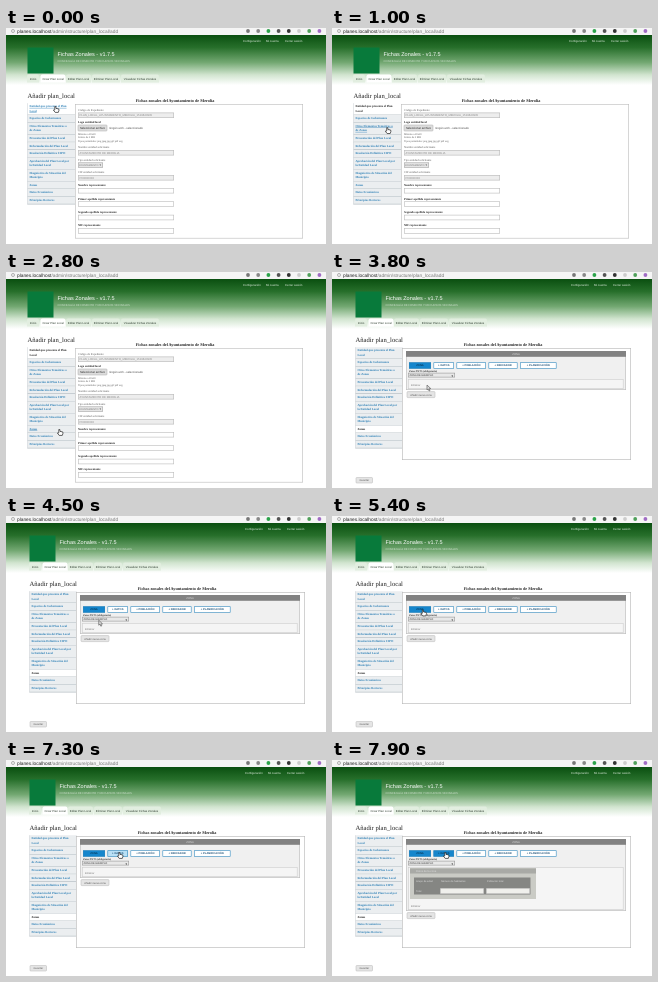
An HTML page with a canvas for the animation above (8 s loop, 320 by 216 pixels).

```html
<!DOCTYPE html>
<html lang="es">
<head>
<meta charset="utf-8">
<title>Añadir plan_local</title>
<style>
  html, body { margin: 0; width: 100%; height: 100%; overflow: hidden; background: #fff; }
  canvas { display: block; width: 320px; height: 216px; }
</style>
</head>
<body>
<canvas id="stage"></canvas>
<script>
const LOOP = 8000;
const SANS = '"Liberation Sans", sans-serif';
const SERIF = '"Liberation Serif", serif';
const BLUE = '#2c7fb5';
const TAB_BLUE = '#1686cc';

const canvas = document.getElementById('stage');
const ctx = canvas.getContext('2d');
const ratio = window.devicePixelRatio || 1;
canvas.width = 320 * ratio;
canvas.height = 216 * ratio;
ctx.scale(ratio, ratio);
ctx.textRendering = 'geometricPrecision';

function box(x, y, w, h, fill, stroke) {
  if (fill) { ctx.fillStyle = fill; ctx.fillRect(x, y, w, h); }
  if (stroke) {
    ctx.strokeStyle = stroke;
    ctx.lineWidth = 0.6;
    ctx.strokeRect(x + 0.3, y + 0.3, w - 0.6, h - 0.6);
  }
}

function round(x, y, w, h, r, fill, stroke) {
  ctx.beginPath();
  ctx.roundRect(x, y, w, h, r);
  ctx.fillStyle = fill;
  ctx.fill();
  if (stroke) { ctx.strokeStyle = stroke; ctx.lineWidth = 0.5; ctx.stroke(); }
}

function dot(x, y, r, fill) {
  ctx.beginPath();
  ctx.arc(x, y, r, 0, Math.PI * 2);
  ctx.fillStyle = fill;
  ctx.fill();
}

function text(str, x, y, size, color, font = SERIF, weight = '', align = 'left') {
  ctx.font = `${weight} ${size}px ${font}`;
  ctx.textAlign = align;
  ctx.fillStyle = color;
  ctx.fillText(str, x, y);
  return ctx.measureText(str).width;
}

const progress = (t, from, to) => Math.min(1, Math.max(0, (t - from) / (to - from)));
const ease = p => p * p * (3 - 2 * p);

// Pointer stops: time, x, y
const stops = [
  [0, 50, 80], [400, 50, 80], [1200, 57, 105], [1800, 56, 143], [2200, 54, 159],
  [3000, 54, 159], [3800, 96, 113], [4100, 96, 113], [4900, 91.5, 95.5],
  [6500, 91.5, 95.5], [7100, 114, 94], [LOOP, 114, 94]
];

function pointerAt(t) {
  const i = stops.findIndex(s => s[0] > t);
  const [t0, x0, y0] = stops[i - 1], [t1, x1, y1] = stops[i];
  const p = ease(progress(t, t0, t1));
  return { x: x0 + (x1 - x0) * p, y: y0 + (y1 - y0) * p };
}

function drawPointer({ x, y }, hand) {
  ctx.save();
  ctx.translate(x, y);
  ctx.beginPath();
  const outline = hand
    ? [[-1.2, -1.5], [-0.2, -1.5], [0, 0.4], [2.7, 0.9], [3, 2.2], [2.3, 4.4], [-0.8, 4.4], [-2.6, 2], [-1.2, 1.8]]
    : [[-1, 0], [-1, 5], [0.2, 4], [1.1, 6], [2, 5.6], [1.1, 3.7], [2.8, 3.6]];
  outline.forEach(p => ctx.lineTo(...p));
  ctx.closePath();
  ctx.fillStyle = hand ? '#fff' : '#ddd';
  ctx.strokeStyle = hand ? '#222' : '#666';
  ctx.lineWidth = 0.7;
  ctx.fill();
  ctx.stroke();
  ctx.restore();
}

function drawBrowser() {
  box(0, 0, 320, 7, '#f5f5f5');
  dot(7, 3, 1.7, '#888');
  dot(7, 3, 1.1, '#f5f5f5');
  const host = text('planes.localhost', 11, 4.6, 4.8, '#222', SANS);
  text('/admin/structure/plan_local/add', 11 + host, 4.6, 4.8, '#777', SANS);
  ['#777', '#888', '#2ba34a', '#555', '#333', '#ccc', '#4fa05a', '#a06cc4']
    .forEach((c, i) => dot(242 + i * 10.2, 3, 1.9, c));

  const green = ctx.createLinearGradient(0, 7, 0, 57);
  [[0, '#0a4f10'], [0.25, '#276f2b'], [0.55, '#73a872'], [0.8, '#d2e5d0'], [1, '#fff']]
    .forEach(s => green.addColorStop(...s));
  box(0, 7, 320, 50, green);
}

function drawHeader() {
  box(21.5, 19.5, 26, 26, '#087a3b');
  text('Fichas Zonales - v1.7.5', 51.5, 27.8, 5.5, '#fff', SANS);
  text('CONCEJALÍA DE FOMENTO Y RECURSOS VECINALES', 51.5, 33.8, 2.8, '#cfe0cf', SANS);
  [['Configuración', 237], ['Mi cuenta', 260], ['Cerrar sesión', 279]]
    .forEach(([s, x]) => text(s, x, 14.3, 2.9, '#e8f3e8', SANS));

  [['Inicio', 21, 12], ['Crear Plan Local', 34.5, 25], ['Editar Plan Local', 60, 25],
   ['Eliminar Plan Local', 86, 28], ['Visualizar Fichas Zonales', 115, 38]].forEach(([s, x, w], i) => {
    round(x, 46.5, w, 8, [2, 2, 0, 0], i === 1 ? '#fff' : '#e2eee0');
    text(s, x + w / 2, 51.7, 2.85, '#28382a', SANS, '', 'center');
  });
  text('Añadir plan_local', 21.5, 70, 6.6, '#222');
  text('Fichas zonales del Ayuntamiento de Merolia', 169, 73.7, 4.2, '#222', SERIF, 'bold', 'center');
}

const menu = [
  ['Entidad que presenta el Plan', 'Local'], ['Espacios de Gobernanza'],
  ['Otros Elementos Temáticos o', 'de Zonas'], ['Presentación del Plan Local'],
  ['Reformulación del Plan Local'], ['Resolución Definitiva CIPO'],
  ['Aprobación del Plan Local por', 'la Entidad Local'],
  ['Diagnóstico de Situación del', 'Municipio'], ['Zonas'],
  ['Datos Económicos'], ['Principios Rectores']
];

function drawMenu(active, pointer) {
  let y = 75.2;
  menu.forEach((lines, i) => {
    const h = lines.length > 1 ? 12 : 7.6;
    const hover = pointer.x < 69 && pointer.y >= y && pointer.y < y + h;
    box(21.5, y, 47.5, h, i === active ? '#fff' : '#ebeef0');
    box(21.5, y + h - 0.6, 47.5, 0.6, '#aeb8bf');
    lines.forEach((s, n) => {
      const base = y + 4.2 + n * 4.4;
      const w = text(s, 23.4, base, 3.02, i === active && !hover ? '#222' : BLUE, SERIF, 'bold');
      if (hover) box(23.4, base + 0.5, w, 0.4, BLUE);
    });
    y += h;
  });
  box(21.2, 75.2, 0.5, y - 75.2, '#c8ced2');
}

function field(label, y, value, bold) {
  text(label, 72, y, 2.9, bold ? '#222' : '#555', SERIF, bold ? 'bold' : '');
  box(72, y + 1.8, 96, 5.4, value ? '#ededed' : '#fff', '#bbb');
  if (value) text(value, 73.5, y + 5.6, 2.8, '#888', SANS);
}

function drawEntityForm() {
  box(69, 76, 228, 134.5, '#fff', '#bbb');
  field('Código de Expediente', 82.8, 'PLAN_LOCAL_AYUNTAMIENTO_MEROLIA_1519640935');
  text('Logo entidad local', 72, 95.3, 2.9, '#222', SERIF, 'bold');
  round(72, 97, 29, 6, 0.8, '#ddd', '#aaa');
  text('Seleccionar archivo', 86.5, 101, 2.9, '#222', SANS, '', 'center');
  text('ningún arch...seleccionado', 103, 101, 2.85, '#444', SANS);
  ['Mínimo a 20x20', 'Límite de 2 MB', 'Tipos permitidos: png jpeg jpg gif pdf svg']
    .forEach((s, i) => text(s, 72, 106.5 + i * 3.7, 2.65, '#555'));
  field('Nombre entidad solicitante', 120.2, 'AYUNTAMIENTO DE MEROLIA');
  text('Tipo entidad solicitante', 72, 133.2, 2.9, '#555');
  box(72, 134.5, 25, 5.2, '#e6e6e6', '#aaa');
  text('AYUNTAMIENTO', 73, 138.1, 2.5, '#777', SANS);
  text('▾', 93.5, 138.4, 3, '#555', SANS);
  field('CIF entidad solicitante', 145.2, 'P0000000X');
  ['Nombre representante', 'Primer apellido representante', 'Segundo apellido representante', 'NIF representante']
    .forEach((s, i) => field(s, 158.2 + i * 13.4, '', true));
}

function button(label, x, y, w, h) {
  round(x, y, w, h, 0.8, '#e5e5e5', '#b5b5b5');
  text(label, x + w / 2, y + h / 2 + 1, 2.6, '#555', SANS, '', 'center');
}

function drawZoneTabs(open, second) {
  const h = 4.8 + 1.4 * open;
  const size = 1.9 + 0.75 * open;
  [['ZONA', 77, 22], ['+ DATOS', 101.5, 20.5], ['+ POBLACIÓN', 124.5, 29.5],
   ['+ INDICADOR', 156.5, 29], ['+ PLANIFICACIÓN', 188, 36.5]].forEach(([s, x, w], i) => {
    const fill = i === 0 ? TAB_BLUE : i === 1 ? second : '#fff';
    box(x, 90.4, w, h, fill, '#3389bd');
    text(s, x + w / 2, 90.4 + h / 2 + size * 0.36, size, fill === TAB_BLUE ? '#063b60' : '#1c5078', SANS, 'bold', 'center');
  });
}

function drawDataTable() {
  box(78, 108, 126, 31, '#cacbc5');
  box(78, 108.5, 126, 5, '#a9aaa6');
  text('Datos de la zona', 84, 112.2, 2.7, '#ddd', SANS);
  box(82, 117.5, 116.5, 17, '#858683');
  ['Grupo de edad', 'Número de habitantes', 'Población total'].forEach((label, i) => {
    const x = [83, 108, 154][i];
    text(label, x + 1, 122, 2.5, '#ddd', SANS);
    if (i) box(x, 128, 44, 6, '#f0f0ec', '#aaa');
    else text('Total', x + 1, 132, 2.5, '#ddd', SANS);
  });
}

function drawZoneForm(t) {
  const open = 1 - ease(progress(t, 5500, 5900)) + ease(progress(t, 6300, 6800));
  const grow = ease(progress(t, 7400, 7900));
  const bottom = 98 + 20 * open + 33 * grow;
  const second = t >= 7450 ? TAB_BLUE : t >= 7000 ? '#b9e0f5' : '#fff';

  box(70, 76, 229, 112, '#fff', '#b5b5b5');
  box(74, 79, 220, bottom - 79, '#f0f0f0', '#bbb');
  box(74, 79, 220, 5.8, '#828282');
  text('ZONA', 184, 82.9, 2.7, '#ddd', SANS, '', 'center');
  drawZoneTabs(open, second);

  ctx.save();
  ctx.beginPath();
  ctx.rect(74, 97, 220, Math.max(0, bottom - 97));
  ctx.clip();
  if (open > 0.05) {
    text('Zona ZNTS (obligatoria)', 77, 100.2, 2.65, '#333', SERIF, 'bold');
    box(76, 100.8, 47, 4.6, '#e8e8e8', '#999');
    text('ZONA DE EJEMPLO', 77.5, 104.1, 2.55, '#333', SANS);
    text('▾', 119.5, 104.5, 3, '#222', SANS);
    box(76, 107, 215.5, bottom - 108, '#f5f5f5', '#ccc');
    ctx.globalAlpha = grow;
    if (grow) drawDataTable();
    ctx.globalAlpha = 1;
    text('Eliminar', 79, bottom - 4.5, 2.6, '#777', SANS);
  }
  ctx.restore();
  button('Añadir nueva zona', 75, bottom + 1.6, 28, 6);
  button('Guardar', 24, 205.5, 16.5, 5.5);
}

function draw(now) {
  const t = now % LOOP;
  const zones = t >= 3000;
  const pointer = pointerAt(t);
  box(0, 0, 320, 216, '#fff');
  drawBrowser();
  ctx.save();
  // The shorter page has no scrollbar, so its centred content sits further right.
  if (zones) ctx.translate(2, 0);
  drawHeader();
  drawMenu(zones ? 8 : 0, pointer);
  ctx.restore();
  if (zones) drawZoneForm(t); else drawEntityForm();
  drawPointer(pointer, !(t > 3200 && t < 4600));
  requestAnimationFrame(draw);
}
requestAnimationFrame(draw);
</script>
</body>
</html>
```
